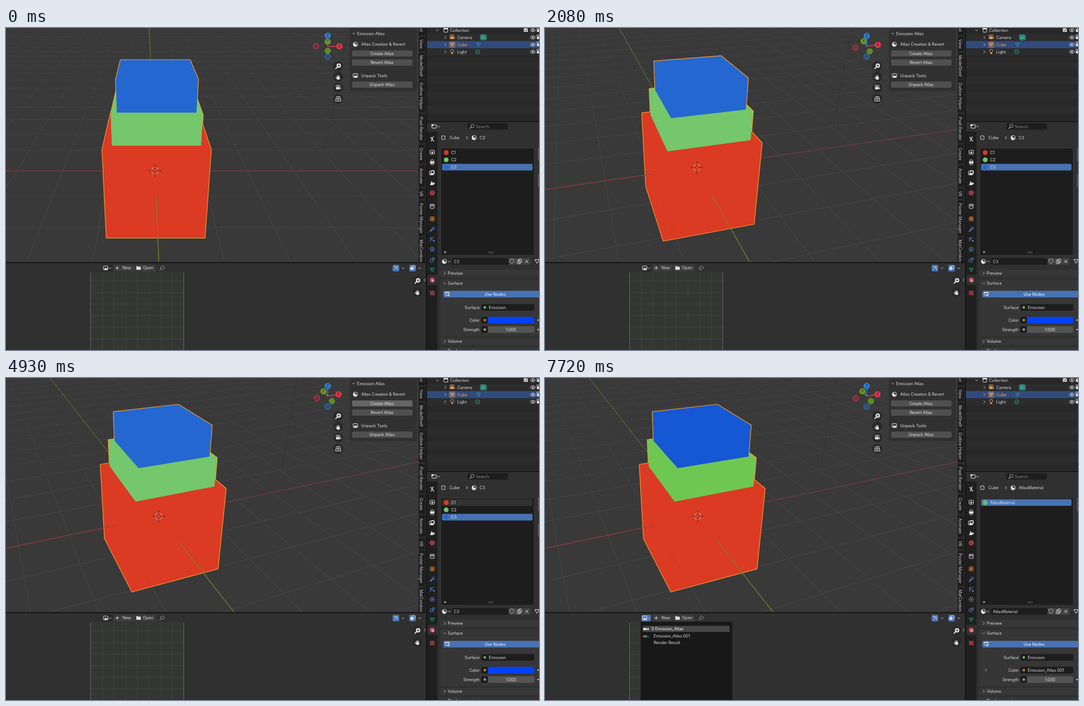
Recreate the animation shown at these times as an HTML page with a canvas. Size 961x582 px, loop 8 s.

```html
<!DOCTYPE html>
<html lang="en">
<head>
<meta charset="utf-8">
<title>Emission atlas demo</title>
<style>
html, body { margin: 0; width: 100%; height: 100%; overflow: hidden; background: #303030; }
canvas { display: block; }
</style>
</head>
<body>
<canvas id="stage" width="961" height="582"></canvas>
<script>
const g = document.getElementById('stage').getContext('2d');
const LOOP = 8000, TAU = Math.PI * 2;
const LIGHT = '#dedede', BLUE = '#4772b3', FIELD = '#1d1d1d', PANEL = '#303030';

// ---------- drawing helpers ----------
function box(x, y, x2, y2, color, r = 0) {
  g.fillStyle = color;
  g.beginPath();
  g.roundRect(x, y, x2 - x, y2 - y, r);
  g.fill();
}
function frame(x, y, x2, y2, color = LIGHT, r = 1) {
  g.strokeStyle = color;
  g.lineWidth = 1;
  g.beginPath();
  g.roundRect(x, y, x2 - x, y2 - y, r);
  g.stroke();
}
function dot(x, y, r, color, ring) {
  g.beginPath();
  g.arc(x, y, r, 0, TAU);
  if (color) { g.fillStyle = color; g.fill(); }
  if (ring) { g.strokeStyle = ring; g.lineWidth = 1; g.stroke(); }
}
function path(points, color, width = 1, fill) {
  g.beginPath();
  points.forEach(p => g.lineTo(p[0], p[1]));
  if (fill) { g.closePath(); g.fillStyle = fill; g.fill(); }
  if (color) { g.strokeStyle = color; g.lineWidth = width; g.stroke(); }
}
function text(s, x, y, color = LIGHT, align = 'left', size = 7.3) {
  g.font = size + 'px Inter, sans-serif';
  g.textAlign = align;
  g.textBaseline = 'middle';
  g.fillStyle = color;
  g.fillText(s, x, y + .4);
}
const down = (x, y, c = '#b5b5b5') => path([[x - 2.3, y - 1.2], [x, y + 1.3], [x + 2.3, y - 1.2]], c);
const right = (x, y, c = '#b5b5b5') => path([[x - 1.3, y - 2.5], [x + 1.3, y], [x - 1.3, y + 2.5]], c);
function sphere(x, y, r = 4) {
  dot(x, y, r, null, LIGHT);
  g.fillStyle = LIGHT;
  g.beginPath();
  g.arc(x, y, r, 1.2, 4.2);
  g.fill();
  dot(x + 1, y + 1.2, 1.6, LIGHT);
}
function lens(x, y, c = LIGHT) {
  dot(x + 1, y - 1, 3, null, c);
  path([[x - 1.2, y + 1.2], [x - 4, y + 4]], c, 1.4);
}
function zoom(x, y) {
  dot(x, y, 9, '#292929');
  dot(x + 1, y - 1, 4, LIGHT);
  path([[x - 1.5, y + 1.5], [x - 5, y + 5]], LIGHT, 1.8);
  path([[x - 1, y - 1], [x + 3, y - 1]], '#292929');
  path([[x + 1, y - 3], [x + 1, y + 1]], '#292929');
}
function hand(x, y) {
  dot(x, y - 1, 9, '#292929');
  box(x - 2.5, y - 1, x + 3, y + 4.5, LIGHT, 2);
  for (let i = -2; i < 3; i += 1.7) path([[x + i, y], [x + i, y - 4 + Math.abs(i) * .5]], LIGHT, 1.1);
  path([[x - 2, y + 3], [x - 4.5, y]], LIGHT, 1.3);
}
function camera(x, y, c = LIGHT) {
  dot(x - 2.2, y - 2, 1.8, null, c);
  dot(x + 1.6, y - 2, 1.8, null, c);
  box(x - 4, y, x + 2.5, y + 4, c, 1);
  path([[x + 2, y + 2], [x + 4.7, y], [x + 4.7, y + 4]], null, 0, c);
}
function eye(x, y) {
  g.beginPath();
  g.ellipse(x, y, 4.2, 2.7, 0, 0, TAU);
  g.strokeStyle = LIGHT;
  g.lineWidth = 1;
  g.stroke();
  dot(x, y, 1.5, LIGHT);
}
function picture(x, y, c = LIGHT) {
  frame(x - 4, y - 3.5, x + 4, y + 3.5, c);
  path([[x - 3, y + 3], [x - 1, y - 1], [x + 1, y + 1], [x + 2.5, y - .5], [x + 3.5, y + 3]], null, 0, c);
}
const tri = (x, y, c, fill) => path([[x - 3.5, y - 2.7], [x + 3.5, y - 2.7], [x, y + 3.3], [x - 3.5, y - 2.7]], c, 1, fill);

// ---------- 3D view ----------
const FOCAL = 725, CX = 253, CY = 186;
// time, yaw, pitch, screen x and y of the world origin, distance
const POSES = [
  [1380, 0, 23.4, 268.8, 258, 8.71],
  [1520, 1, 23.8, 269, 257.6, 8.72],
  [2080, 15.2, 27, 273.8, 252, 8.87],
  [2220, 16.6, 27, 274.2, 251.6, 8.88],
  [2920, 21.3, 27, 275.5, 250, 8.9]
];
let view;
function setView(t) {
  t = Math.max(1380, Math.min(2920, 1450 + Math.floor((t - 1450) / 70) * 70));
  const i = Math.max(1, POSES.findIndex(p => p[0] >= t));
  const a = POSES[i - 1], b = POSES[i], k = (t - a[0]) / (b[0] - a[0]);
  const [, yaw, pitch, ox, oy, d] = a.map((v, j) => v + (b[j] - v) * k);
  const r = Math.PI / 180;
  view = { yaw, ox, oy, d, sy: Math.sin(yaw * r), cy: Math.cos(yaw * r), sp: Math.sin(pitch * r), cp: Math.cos(pitch * r) };
}
// right, down and forward parts of a world direction
function turn([x, y, z]) {
  const v = view, f = x * v.sy + y * v.cy;
  return [x * v.cy - y * v.sy, -f * v.sp - z * v.cp, f * v.cp - z * v.sp];
}
function toCam(p) {
  const [x, y, z] = turn(p), { ox, oy, d } = view;
  return [x + (ox - CX) * d / FOCAL, y + (oy - CY) * d / FOCAL, z + d];
}
const flat = ([x, y, z]) => [CX + FOCAL * x / z, CY + FOCAL * y / z];
function line3(p, q, color, width = 1) {
  let a = toCam(p), b = toCam(q);
  const near = .3;
  if (a[2] < near && b[2] < near) return;
  const cut = (u, w) => u.map((v, i) => v + (w[i] - v) * (near - u[2]) / (w[2] - u[2]));
  if (a[2] < near) a = cut(a, b);
  else if (b[2] < near) b = cut(b, a);
  path([flat(a), flat(b)], color, width);
}
function hull(points) {
  points.sort((a, b) => a[0] - b[0] || a[1] - b[1]);
  const half = list => {
    const h = [];
    for (const p of list) {
      for (let n; (n = h.length) > 1; h.pop()) {
        const [a, b] = [h[n - 2], h[n - 1]];
        if ((b[0] - a[0]) * (p[1] - a[1]) - (b[1] - a[1]) * (p[0] - a[0]) > 0) break;
      }
      h.push(p);
    }
    return h.slice(0, -1);
  };
  return [...half(points), ...half([...points].reverse())];
}
function block(w, z1, z2) {
  const pts = [];
  for (const x of [-w, w]) for (const y of [-w, w]) for (const z of [z1, z2]) pts.push(flat(toCam([x, y, z])));
  return hull(pts);
}

function gizmo() {
  const x0 = 580, y0 = 33, R = 21;
  const colors = [['#e8364f', '#70333d'], ['#6f9a1e', '#5d8a26'], ['#2c83e0', '#2f4d6d']];
  const ends = [];
  colors.forEach(([hi, lo], i) => {
    for (const s of [1, -1]) {
      const v = [0, 0, 0];
      v[i] = s;
      const [x, y, z] = turn(v);
      ends.push({ x: x0 + x * R, y: y0 + y * R, z, s, hi, lo, name: 'XYZ'[i] });
    }
  });
  ends.sort((a, b) => b.z - a.z).forEach(e => {
    if (e.s > 0) {
      path([[x0, y0], [e.x, e.y]], e.hi, 1.5);
      dot(e.x, e.y, 5.5, e.hi);
      text(e.name, e.x, e.y, '#15181c', 'center', 7.5);
    } else dot(e.x, e.y, 5, e.lo, e.hi);
  });
}

function viewport(t) {
  g.save();
  g.beginPath();
  g.rect(0, 0, 757, 423);
  g.clip();
  box(0, 0, 757, 423, '#393939');
  setView(t);
  const fade = g.createLinearGradient(0, 0, 0, 260);
  fade.addColorStop(0, '#404040');
  fade.addColorStop(1, '#494949');
  for (let i = -30; i <= 30; i++) if (i) {
    line3([i, -12, 0], [i, 30, 0], fade, .8);
    line3([-30, i, 0], [30, i, 0], fade, .8);
  }
  const red = '#873944', green = '#64822a';
  line3([-40, 0, 0], [40, 0, 0], red);
  line3([0, -12, 0], [0, 40, 0], green);
  line3([4.08, 1, 0], [4.08, 1, 3], '#303030', .8);

  const baked = t >= 5660;
  const fills = ['#db3a23', baked ? '#6fc753' : '#74c76a', baked ? '#1657d3' : '#2467d1'];
  const blocks = [block(1, -1, 1), block(.837, 1, 1.625), block(.732, 1.625, 2.26)];
  g.lineJoin = 'round';
  blocks.forEach(b => path([...b, b[0], b[1]], '#f59a30', 2.4));
  blocks.forEach((b, i) => path(b, null, 0, fills[i]));

  // ground lines passing in front of the object
  for (const x of [-1, 1]) line3([x, -1, 0], [x, -4, 0], 'rgba(80,80,90,.2)', .8);
  line3([0, -1, 0], [0, -12, 0], '#71882a', 1.1);
  if (view.yaw > 5.8) line3([-1, 0, 0], [-40, 0, 0], '#9b3a40');

  const { ox, oy } = view;
  dot(ox, oy, 6, null, '#e8e8e8');
  g.setLineDash([2.4, 2.4]);
  dot(ox, oy, 6, null, '#d33a2e');
  g.setLineDash([]);
  for (const [x, y] of [[1, 0], [-1, 0], [0, 1], [0, -1]])
    path([[ox + x * 3, oy + y * 3], [ox + x * 11, oy + y * 11]], '#302020', .9);

  gizmo();
  zoom(599, 69);
  hand(599, 89);
  dot(599, 108, 9, '#292929');
  camera(599, 107);
  dot(599, 128, 9, '#292929');
  path([[596, 124], [602, 124], [604, 132], [594, 132], [596, 124]], LIGHT);
  path([[599, 124], [599, 132]], LIGHT);
  path([[595, 128], [603, 128]], LIGHT);
  g.restore();
}

function sidebar(t) {
  box(620, 0, 741, 114, 'rgba(48,48,48,.85)', 2);
  down(627, 10);
  text('Emission Atlas', 633, 10);
  sphere(630, 29.5);
  text('Atlas Creation & Revert', 640.5, 29.5);
  picture(630, 86);
  text('Unpack Tools', 640.5, 86);
  const create = t >= 5390 && t < 5660 ? BLUE : t >= 4930 && t < 6660 ? '#656565' : '#505050';
  const over = t >= 4870 && t < 4930 || t >= 6660 && t < 6860;
  [['Create Atlas', 46, create], ['Revert Atlas', 62.4, over ? '#656565' : '#505050'], ['Unpack Atlas', 102.3, '#505050']]
    .forEach(([s, y, c]) => {
      box(624, y - 5.6, 733, y + 5.6, c, 2);
      text(s, 678, y, '#e6e6e6', 'center');
    });
  box(744, 0, 757, 423, '#2b2b2b');
  const tabs = [['Tool', -14, 13], ['View', 16, 42], ['ModelShelf', 45, 92], ['Outline Helper', 94, 152], ['Pixel Render', 156, 208],
    ['Create', 211, 245], ['Animate', 248, 287], ['VR', 290, 309], ['Poster Manager', 312, 376], ['MatCombiner', 379, 432]];
  g.save();
  g.beginPath();
  g.rect(743, 0, 14, 423);
  g.clip();
  for (const [s, a, b] of tabs) {
    box(744, a, 755.5, b, FIELD, 2);
    g.save();
    g.translate(749, (a + b) / 2);
    g.rotate(Math.PI / 2);
    text(s, 0, 0, '#d0d0d0', 'center');
    g.restore();
  }
  g.restore();
}

function imageEditor(t) {
  box(0, 425, 757, 582, PANEL);
  box(153, 441, 321, 582, '#343634');
  for (let i = 1; i < 8; i++) path([[153 + i * 21, 442], [153 + i * 21, 582]], '#434743', .8);
  for (let y = 457; y < 582; y += 21) path([[153, y], [321, y]], '#434743', .8);
  path([[152.5, 442], [152.5, 582]], '#686868');
  path([[320.5, 442], [320.5, 582]], '#686868');
  const open = t >= 7580;
  box(174, 428, 191, 440, open ? BLUE : t >= 7320 ? '#4a4a4a' : '#282828', 2);
  picture(179.7, 433.7);
  down(187.5, 434);
  box(194, 428, 230, 440, '#3d3d3d', 2);
  path([[197.5, 433.7], [203.5, 433.7]], LIGHT);
  path([[200.5, 430.7], [200.5, 436.7]], LIGHT);
  text('New', 210, 433.7);
  box(231, 428, 270, 440, '#3d3d3d', 2);
  path([[235, 437], [235, 430.5], [238, 430.5], [239, 431.5], [243, 431.5], [243, 437]], null, 0, LIGHT);
  text('Open', 247, 433.7);
  path([[277, 438], [280, 435], [278, 433], [282, 430], [286, 433], [282, 437], [280, 435]], '#999');
  for (const x of [703, 733]) {
    box(x - 6, 428, x + 6, 440, BLUE, 2);
    down(x + 13, 434);
  }
  path([[699, 431], [705, 432], [706, 437]], LIGHT);
  path([[700, 437], [706, 431]], LIGHT);
  dot(731.8, 434.5, 3, LIGHT);
  dot(734.5, 432.5, 3, null, LIGHT);
  zoom(742, 457);
  hand(742, 478);
  path([[756, 453], [754, 455.5], [756, 458]], '#aaa');
  if (!open) return;
  box(172.5, 440.5, 337.5, 590, '#181818', 2);
  frame(172.5, 440.5, 337.5, 590, '#242424', 2);
  box(176, 448, 333, 459, '#464646', 2);
  box(177, 452, 187, 455.5, '#e8e8e8');
  box(183, 452, 185, 455.5, '#888');
  text('0 Emission_Atlas', 192, 453.7, '#fff');
  if (t >= 7720) ['#e0201c', '#20c820', '#1030e8'].forEach((c, i) => box(176 + i * 3.7, 465, 179.7 + i * 3.7, 469, c));
  text('Emission_Atlas.001', 196, 466.2);
  text('Render Result', 196, 478.5);
}

function outliner() {
  box(759, 0, 961, 168, '#282828');
  for (let y = 10.5; y < 168; y += 26) box(759, y, 961, Math.min(168, y + 13), '#2c2c2c');
  box(759, 23.5, 961, 36.5, '#304a7c');
  down(778, 4);
  box(789, 0, 797, 2.5, LIGHT);
  frame(789.5, 1, 796.5, 7.5);
  text('Collection', 800.5, 4);
  box(933.5, .5, 941, 7, LIGHT, 1.5);
  path([[935, 3.5], [937, 5.5], [940, 1.5]], '#222');
  ['Camera', 'Cube', 'Light'].forEach((s, i) => {
    const y = 17 + i * 13;
    right(792, y);
    text(s, 813.5, y, i === 1 ? '#ffa63b' : LIGHT);
  });
  for (const y of [4, 17, 30, 43]) {
    eye(950, y);
    camera(961, y - 1);
  }
  const orange = '#e39a57', teal = '#27a98b';
  camera(804.5, 16, orange);
  box(854.5, 11.5, 867, 22.5, '#3b6c6c', 3);
  camera(860.5, 16, teal);
  box(798.5, 24, 810.5, 36, '#6d6472', 3);
  tri(804.5, 30, orange, '#c57d42');
  tri(852, 30, teal);
  dot(804.5, 41.5, 2.8, null, orange);
  box(803, 44.5, 806, 47, orange);
  dot(850.5, 43, 3.7, null, teal);
  dot(850.5, 43, 1, teal);
}

function propertyTabs() {
  box(759, 187, 778, 582, '#1f1f1f');
  box(760, 446, 779, 464.5, PANEL, 2);
  const x = 768.5, pink = '#d14b52', blue = '#4f8fe0';
  path([[x - 3, 197], [x + 3, 205]], LIGHT, 1.3);
  path([[x + 2, 196], [x - 2, 205]], LIGHT, 1.3);
  frame(x - 4, 221, x + 4, 228);
  dot(x, 225, 1.8, LIGHT);
  box(x - 4, 241, x + 4, 245, LIGHT, 1);
  frame(x - 2.5, 238.5, x + 2.5, 247);
  picture(x - 1, 262);
  frame(x - 2, 257.5, x + 4, 263);
  path([[x - 4, 284], [x - 1, 276], [x + 2, 284]], null, 0, LIGHT);
  dot(x + 2.5, 281, 2, LIGHT);
  dot(x, 298, 4, '#7d3038', pink);
  path([[x - 3, 296], [x, 299], [x + 3, 297]], pink);
  frame(x - 4, 318.5, x + 4, 321);
  frame(x - 3.5, 321, x + 3.5, 326);
  frame(x - 3.5, 341.5, x + 3.5, 348.5, '#e88a3c');
  box(x - 2, 343, x + 2, 347, '#c9702c');
  path([[x - 4, 368], [x + 1, 363]], blue, 2);
  dot(x + 2, 362, 2.2, null, blue);
  path([[x - 3, 386], [x - 3, 379], [x + 3, 379]], blue);
  path([[x - 3, 380], [x + 3, 385]], blue);
  dot(x + 3, 385, 1.4, blue);
  dot(x, 400, 3.8, null, blue);
  dot(x, 400, 1.5, blue);
  dot(x - 1, 420, 3, null, blue);
  dot(x + 2, 417, 2, null, blue);
  tri(x, 437, '#25b98d');
  dot(x, 455.5, 4.2, '#cf5757');
  dot(x + 1.5, 457, 2, '#f0a0a0');
  for (let i = 0; i < 16; i++) {
    const u = i % 4, v = i >> 2;
    box(x - 4 + u * 2, 475 + v * 2, x - 2 + u * 2, 477 + v * 2, (u + v) % 2 ? '#5b2a2e' : pink);
  }
}

// value set by the latest step that has begun
const pick = (t, steps, start) => steps.reduce((v, [at, to]) => t >= at ? to : v, start);
function properties(t) {
  box(759, 170, 961, 582, PANEL);
  frame(768, 175, 776, 181);
  box(767, 174, 771, 177, LIGHT);
  down(780, 178);
  box(832, 172, 905, 183.5, FIELD, 2);
  lens(840, 178, '#aaa');
  text('Search', 847, 178, '#8a8a8a');
  propertyTabs();

  const baked = t >= 5660;
  const chosen = pick(t, [[3860, 0], [4140, 1], [4470, 2], [5660, 0]], 2);
  const hover = pick(t, [[3390, 1], [3670, 0], [4000, 1], [4330, 2], [4730, 0], [5660, -1]], -1);
  const name = baked ? 'AtlasMaterial' : 'C' + (chosen + 1);

  frame(785.5, 195, 791.5, 201.5);
  text('Cube', 799.5, 198.3);
  right(831, 198.3, LIGHT);
  sphere(844, 198.3);
  text(name, 854, 198.3);

  box(784, 217, 952.5, 411, FIELD, 2);
  frame(784, 217, 952.5, 411, '#3a3a3a', 2);
  const balls = ['#db3a23', '#74c76a', '#2467d1'];
  (baked ? [name] : ['C1', 'C2', 'C3']).forEach((s, i) => {
    const y = 225.1 + i * 13.2;
    if (i === chosen) box(786.3, y - 6, 949.3, y + 6, BLUE, 2);
    else if (i === hover) box(786.3, y - 6, 949.3, y + 6, '#323232', 2);
    if (!baked || t >= 5730) dot(793.7, y, 4.3, baked ? '#66c255' : balls[i]);
    text(s, 802.5, y, '#e6e6e6');
  });
  path([[790.5, 403], [794, 405], [790.5, 407]], null, 0, '#ccc');
  for (let i = 0; i < 10; i++) dot(870.5 + i % 5 * 1.9, 404.5 + (i > 4) * 2.2, .5, '#aaa');
  box(959, 216, 965, 241, '#545454', 2);
  if (!baked) box(959, 263, 965, 288, '#545454', 2);

  box(785, 416, 803, 428, '#282828', 2);
  sphere(790.5, 422);
  down(799, 422);
  box(804, 416, 906, 428, FIELD, 2);
  text(name, 807.5, 422);
  box(906, 416, 945.5, 428, '#424242', 2);
  path([[908.5, 418.5], [912, 417.5], [915.5, 418.5], [915, 423], [912, 426], [909, 423], [908.5, 418.5]], '#aaa');
  frame(922, 419.5, 927, 426);
  frame(924.5, 417.5, 929.5, 424);
  path([[936.5, 419.5], [941.5, 424.5]], LIGHT);
  path([[941.5, 419.5], [936.5, 424.5]], LIGHT);
  path([[953.5, 418.5], [961, 418.5], [957.5, 425.5], [953.5, 418.5]], LIGHT);

  box(783, 437, 961, 450, '#373737', 2);
  right(791, 443.5);
  text('Preview', 796.5, 443.5);
  box(783, 455, 961, 557, '#363636', 2);
  down(791, 461.5);
  text('Surface', 796.5, 461.5);
  box(788.5, 475, 970, 487, BLUE, 2);
  frame(792, 477.5, 799, 483, LIGHT);
  box(791.5, 477, 799.5, 479, LIGHT);
  dot(797.5, 483, 1.8, LIGHT);
  text('Use Nodes', 882, 481, '#fff', 'center');
  [['Surface', 505], ['Color', 528], ['Strength', 545]].forEach(([s, y]) => text(s, 854, y, LIGHT, 'right'));
  box(857, 499, 952.5, 511, FIELD, 2);
  dot(863.3, 505, 2.2, '#63c763');
  text('Emission', 870.5, 505);
  box(857, 522, baked ? 952.5 : 868.5, 534, FIELD, 2);
  dot(863.3, 528, 2.2, '#cc8230');
  if (baked) {
    right(795, 528);
    text('Emission_Atlas.001', 870.5, 528);
  } else {
    box(869, 522, 952.5, 534, ['#ff0000', '#00ff00', '#0042ff'][chosen], 2);
    dot(959.3, 528, 1.3, LIGHT);
  }
  box(857, 539, 868.5, 551, FIELD, 2);
  dot(863.3, 545, 2.2, '#a1a1a1');
  box(869, 539, 952.5, 551, '#545454', 2);
  text('1.000', 910.5, 545, '#e6e6e6', 'center');
  dot(959.3, 545, 1.3, LIGHT);
  box(783, 560, 961, 573, '#373737', 2);
  right(791, 566.5);
  text('Volume', 796.5, 566.5);
  box(783, 577, 961, 590, '#373737', 2);
  text('Displacement', 796.5, 583.5);
}

const start = performance.now();
function draw() {
  const t = (performance.now() - start) % LOOP;
  box(0, 0, 961, 582, '#161616');
  viewport(t);
  sidebar(t);
  imageEditor(t);
  outliner();
  properties(t);
  requestAnimationFrame(draw);
}
draw();
</script>
</body>
</html>
```
